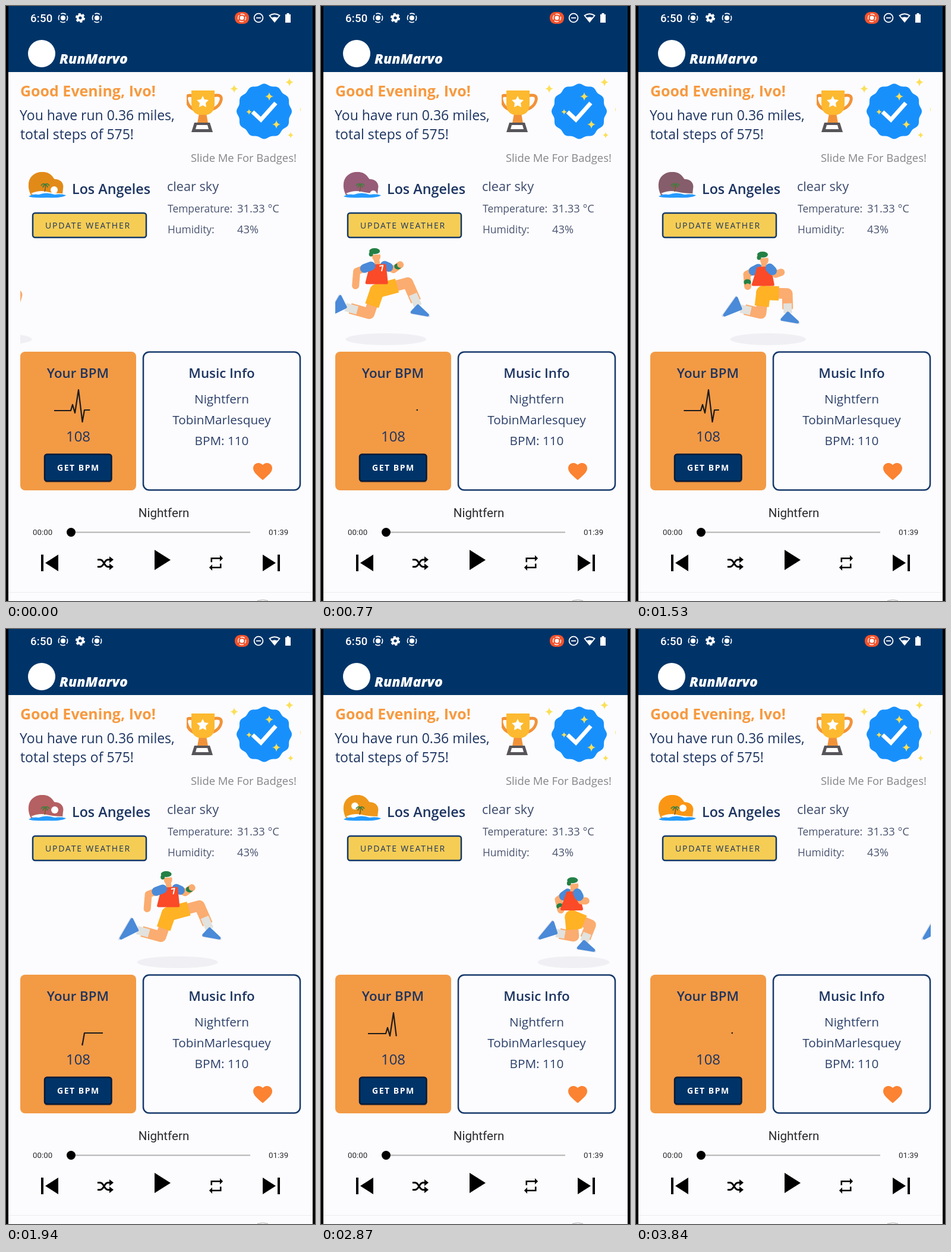
Write an HTML page with a canvas that moves like this. It is 520x1000 px and loops after 3880 ms.

```html
<!DOCTYPE html>
<html lang="en">
<head>
<meta charset="utf-8">
<title>Running dashboard</title>
<style>
  html, body { margin: 0; width: 100%; height: 100%; overflow: hidden; background: #fcfcfe; }
  svg, canvas { position: absolute; left: 0; top: 0; width: 520px; height: 1000px; }
  text { font-family: "Open Sans", "Noto Sans", sans-serif; fill: #1c3461; }
  .body { font-size: 23px; }
  .head { font-size: 22.3px; font-weight: 600; }
  .info { font-size: 20.7px; fill: #2b3f68; }
  .small { font-size: 17.4px; fill: #4a5470; }
  .value { font-size: 18.3px; fill: #4a5470; }
  .mid { text-anchor: middle; }
  .caps { font-size: 14px; font-weight: 500; letter-spacing: 1.8px; }
  .player { font-family: Roboto, sans-serif; fill: #2a2a2e; }
  .sky { animation: sky 3880ms linear infinite; }
  .sun { animation: sun 3880ms linear infinite; }
  @keyframes sky {
    0% { fill: #e28a18; } 19.8% { fill: #975c78; } 29.1% { fill: #585a72; } 50% { fill: #b56062; }
    64.4% { fill: #de8416; } 83.5% { fill: #ffaa1e; } 99%, 100% { fill: #fb9614; }
  }
  @keyframes sun {
    0% { transform: translate(81px, 309px); }
    19.8% { transform: translate(88px, 316px); }
    29.1%, 43.8% { transform: translate(88px, 325px); }
    50% { transform: translate(82px, 304px); }
    55.4% { transform: translate(87px, 325px); }
    55.41% { transform: translate(44px, 325px); }
    64.4% { transform: translate(51px, 308px); }
    83.5% { transform: translate(63px, 287px); }
    99%, 100% { transform: translate(79px, 301px); }
  }
</style>
</head>
<body>
<svg viewBox="0 0 520 1000">
  <defs>
    <path id="spark" d="M0-7Q1-1 7 0Q1 1 0 7Q-1 1-7 0Q-1-1 0-7"/>
    <g id="record" fill="none" stroke="#fff" stroke-width="1.7">
      <circle r="7.6" stroke-dasharray="9 2.94" stroke-dashoffset="4"/>
      <circle r="3.2" fill="#fff"/>
    </g>
    <path id="skip" d="M0 0h4v28h-4zM29 0v28L7 14z"/>
    <path id="blob" d="M38 299C39 285 51 278 62 279C76 279 79 289 82 291C93 291 98 299 96 307L95 317Q70 311 42 318Q37 308 38 299"/>
    <clipPath id="skyClip"><use href="#blob"/></clipPath>
    <clipPath id="cupClip"><rect x="304" y="135" width="70" height="80"/></clipPath>
  </defs>

  <rect width="520" height="1000" fill="#fcfcfe"/>
  <rect width="520" height="111" fill="#003468"/>
  <path d="M0 0h4v1000h-4zM516 0h4v1000h-4z"/>

  <!-- status bar -->
  <text x="41" y="27" style="font:500 18.5px Roboto,sans-serif;fill:#fff;letter-spacing:.3px">6:50</text>
  <use href="#record" x="96" y="20"/>
  <g transform="translate(125 20)" fill="none" stroke="#fff">
    <circle r="4.4" stroke-width="3.6"/><circle r="6.6" stroke-width="3" stroke-dasharray="3.9 3.01"/>
  </g>
  <use href="#record" x="153" y="20"/>
  <rect x="385" y="10" width="24" height="20" rx="9" fill="#f4522c"/>
  <use href="#record" transform="translate(397 20) scale(.85)"/>
  <g fill="none" stroke="#fff" stroke-width="1.8"><circle cx="425" cy="20" r="7.4"/><path d="M421 20h8"/>
    <path d="M443.5 16Q452 10.5 460.5 16L452 26.5z"/></g>
  <path d="M446 20Q452 17 458 20L452 27zM472.500 12h4v2h2.500v14h-9v-14h2.500z" fill="#fff"/>

  <circle cx="60" cy="80" r="23" fill="#fff"/>
  <text x="90" y="97" style="font-size:23px;font-weight:800;font-style:italic;fill:#fff">RunMarvo</text>

  <!-- greeting -->
  <text x="24" y="152" style="font-size:25px;font-weight:700;fill:#f79a40">Good Evening, Ivo!</text>
  <text class="body" x="23" y="192">You have run 0.36 miles,</text>
  <text class="body" x="24" y="224">total steps of 575!</text>
  <text x="311" y="262" style="font-size:18.4px;fill:#85858a">Slide Me For Badges!</text>

  <!-- badges -->
  <g clip-path="url(#cupClip)">
    <path d="M314 151Q302 148 304 158Q307 172 320 175M348 151Q364 147 362 158Q359 171 343 175" fill="none" stroke="#f29238" stroke-width="5"/>
    <path d="M325 180h12l3 17h-18z" fill="#f29238"/>
    <path d="M312 142h39v22q0 16-13 19h-13q-13-3-13-19z" fill="#fdb92f"/>
    <path d="M331 151l3 6 7 1-5 5 1 7-6-3-6 3 1-7-5-5 7-1z" fill="#fff"/>
    <path d="M317 196h26l5 16h-36z" fill="#57555a"/>
    <path d="M321 200h18l2 7h-22z" fill="#fff"/>
  </g>
  <path id="badge" fill="#1890fc"/>
  <path d="M415 178l14 13 25-28" fill="none" stroke="#fff" stroke-width="7"/>
  <g fill="#fbdf58">
    <use href="#spark" x="477" y="128"/><use href="#spark" x="384" y="139"/><use href="#spark" x="443" y="152"/>
    <use href="#spark" transform="translate(409 178) scale(.7)"/><use href="#spark" x="455" y="199"/>
    <use href="#spark" transform="translate(479 217) scale(.75)"/>
    <path d="M495 174l1-4v8z"/>
  </g>

  <!-- weather -->
  <use href="#blob" class="sky"/>
  <g clip-path="url(#skyClip)"><circle class="sun" r="6" fill="#fff"/></g>
  <path d="M42 315Q56 309 68 312T96 315L92 318H48z" fill="#fcfcfe"/>
  <path d="M38 320Q46 315 55 317Q68 312 82 317Q92 315 101 318Q96 323 69 322Q45 323 38 320" fill="#259bff"/>
  <path d="M65 312q2-7 1-12" fill="none" stroke="#7a5a2a" stroke-width="1.6"/>
  <path d="M66 300q-4-3-7 2M66 300q-3 1-4 5M66 300q4-3 7 2M66 300q3 1 4 5" fill="none" stroke="#3d7f3c" stroke-width="1.8"/>
  <text x="111" y="316" style="font-size:23.3px;font-weight:600">Los Angeles</text>
  <rect x="45" y="348" width="191" height="41" rx="4" fill="#f5cd55" stroke="#12386a" stroke-width="2.5"/>
  <text class="caps" x="66" y="374">UPDATE WEATHER</text>
  <text x="271" y="311" style="font-size:21.7px;fill:#3c4a6c">clear sky</text>
  <text class="small" x="272" y="347">Temperature:</text><text class="value" x="389" y="347">31.33 °C</text>
  <text class="small" x="272" y="382">Humidity:</text><text class="value" x="389" y="382">43%</text>

  <!-- cards -->
  <rect x="24" y="581" width="195" height="233" rx="8" fill="#f39a45"/>
  <text class="head mid" x="121" y="625">Your BPM</text>
  <text class="mid" x="121.5" y="732" style="font-size:24px">108</text>
  <rect x="65" y="755" width="113" height="46" rx="4" fill="#0003"/>
  <rect x="65" y="753.5" width="112.5" height="45" rx="4" fill="#003468" stroke="#061a38" stroke-width="2.5"/>
  <text class="caps" x="86" y="781" style="font-weight:700;fill:#fff;letter-spacing:1.5px">GET BPM</text>
  <rect x="231" y="581.5" width="264" height="232" rx="10" fill="none" stroke="#173a6c" stroke-width="2.5"/>
  <text class="head mid" x="363" y="625">Music Info</text>
  <text class="info mid" x="363" y="668">Nightfern</text>
  <text class="info mid" x="363" y="703">TobinMarlesquey</text>
  <text class="info mid" x="363" y="738">BPM: 110</text>
  <path transform="translate(412.8 763.2) scale(1.6)" fill="#fb8332" d="M12 21L10.5 19.7C5.4 15.4 2 12.3 2 8.5C2 5.4 4.4 3 7.5 3C9.2 3 10.9 3.8 12 5.1C13.1 3.8 14.8 3 16.5 3C19.6 3 22 5.4 22 8.5C22 12.3 18.6 15.4 13.5 19.7z"/>

  <!-- player -->
  <text class="player mid" x="265.5" y="859" style="font-size:20.6px">Nightfern</text>
  <text class="player" x="45" y="889" style="font-size:13.3px">00:00</text>
  <text class="player" x="442" y="889" style="font-size:13.3px">01:39</text>
  <path d="M109 884.500H411" stroke="#b2b2b2" stroke-width="2"/>
  <circle cx="109.5" cy="884.5" r="7.5"/>
  <use href="#skip" x="59" y="922"/>
  <use href="#skip" transform="translate(461 922) scale(-1 1)"/>
  <path d="M250 914v34l27-17z"/>
  <path d="M154 930.500h4q3 0 5 3l4 6q2 3 5 3h4M154 942.500h4q3 0 5-3l4-6q2-3 5-3h4" fill="none" stroke="#000" stroke-width="3"/>
  <path d="M174 925l7 5.500-7 5.500zM174 937l7 5.500-7 5.500z"/>
  <path transform="translate(338 920.5) scale(1.29)" d="M7 7h10v3l4-4-4-4v3H5v6h2zM17 17H7v-3l-4 4 4 4v-3h12v-6h-2z"/>
  <path d="M4 985.500H516" stroke="#ececf0"/>
  <path d="M423 999.500Q433 996.500 441 999.500" fill="none" stroke="#aaa"/>
</svg>
<canvas width="520" height="1000"></canvas>

<script>
const LOOP = 3880, STRIDE = 1235, PULSE = 1540;
const SKIN = '#fbac70', BLUE = '#4a8ad8', SHORTS = '#ffb224', RED = '#fa4a28', GREEN = '#238045';
const ctx = document.querySelector('canvas').getContext('2d');
const clamp = v => Math.min(1, Math.max(0, v));
const mix = (a, b, k) => a + (b - a) * k;
const between = (p, q, k) => [mix(p[0], q[0], k), mix(p[1], q[1], k)];

const rim = Array.from({ length: 144 }, (_, i) => {
  const a = i * Math.PI / 72, r = 45 + 1.5 * Math.cos(12 * a);
  return `${434.5 + r * Math.cos(a)} ${177 + r * Math.sin(a)}`;
});
document.getElementById('badge').setAttribute('d', `M${rim.join('L')}z`);

// Points per pose: hair, hip, shadow (centre, radius), near arm, far arm, near leg, far leg.
const leap = [[0, 412], [4, 479], [19, 68],
  [-6, 437], [-30, 446], [-32, 470], [17, 436], [32, 443], [43, 435],
  [56, 465], [73, 504], [91, 521], [-9, 517], [-49, 506], [-79, 521]];
const pass = [[16, 427], [13, 487], [10, 57],
  [7, 447], [-5, 459], [2, 473], [20, 447], [23, 463], [29, 467],
  [35, 512], [11, 535], [29, 551], [23, 516], [-2, 513], [-32, 520]];
const push = [[9, 416], [7, 483], [12, 61],
  [24, 437], [38, 450], [48, 444], [-3, 437], [-18, 452], [-24, 472],
  [-12, 516], [-46, 520], [-58, 545], [53, 477], [48, 517], [66, 544]];
const swap = ([a, b, c, ...limbs]) => [a, b, c,
  ...limbs.slice(3, 6), ...limbs.slice(0, 3), ...limbs.slice(9), ...limbs.slice(6, 9)];
const gait = [[-.03, leap], [.03, leap], [.317, pass], [.427, push], [.47, swap(leap)],
  [.53, swap(leap)], [.817, swap(pass)], [.927, swap(push)], [.97, leap], [1.03, leap]];

function poseAt(phase) {
  const i = gait.findIndex(([p]) => p > phase);
  const [[p0, a], [p1, b]] = [gait[i - 1], gait[i]];
  return a.map((pt, j) => between(pt, b[j], (phase - p0) / (p1 - p0)));
}

function line(points, color, width, cap = 'round') {
  ctx.beginPath();
  points.forEach(p => ctx.lineTo(...p));
  ctx.strokeStyle = color;
  ctx.lineWidth = width;
  ctx.lineCap = cap;
  ctx.lineJoin = 'round';
  ctx.stroke();
}

function shape(points, color, round) {
  line([...points, points[0]], color, round);
  ctx.fillStyle = color;
  ctx.fill();
}

function oval(x, y, rx, ry, color) {
  ctx.beginPath();
  ctx.ellipse(x, y, rx, ry, 0, 0, 7);
  ctx.fillStyle = color;
  ctx.fill();
}

function drawLeg(hip, knee, ankle, toe) {
  const [dx, dy] = [toe[0] - ankle[0], toe[1] - ankle[1]];
  const heel = [ankle[0] - dy * .65, ankle[1] + dx * .65];
  line([hip, knee, between(knee, ankle, .8)], SKIN, 18, 'butt');
  line([between(knee, ankle, .5), ankle], '#e2e2de', 14, 'butt');
  line([heel, toe], '#dcdfea', 4);
  shape([ankle, between(heel, ankle, .1), between(toe, ankle, .1)], BLUE, 5);
  line([hip, between(hip, knee, .65)], SHORTS, 24, 'butt');
  oval(...hip, 12, 12, SHORTS);
}

function drawArm(shoulder, elbow, hand) {
  line([shoulder, elbow, hand], SKIN, 12);
  line([shoulder, between(shoulder, elbow, .45)], BLUE, 15);
}

function drawRunner(t) {
  const phase = ((t - 738) / STRIDE + 1) % 1;
  const [hair, hip, shadow, ...limbs] = poseAt(phase);
  const [nearArm, farArm, nearLeg, farLeg] = [0, 3, 6, 9].map(i => limbs.slice(i, i + 3));
  ctx.save();
  ctx.beginPath();
  ctx.rect(24, 395, 472, 180);
  ctx.clip();
  ctx.translate(90 + .1534 * (t - 770), 0);
  oval(shadow[0], 560, shadow[1], 10, '#f0f0f4');
  drawArm(...farArm);
  oval(...between(farArm[1], farArm[2], .65), 6, 5, GREEN);
  oval(...farArm[2], 5, 5, SKIN);
  drawLeg(hip, ...farLeg);
  drawLeg(hip, ...nearLeg);

  const [x, y] = hair;
  const [near, far] = [nearArm[0], farArm[0]];
  const [back, front] = near[0] < far[0] ? [near, far] : [far, near];
  line([[x + 2, y + 9], between(near, far, .5)], SKIN, 9);
  shape([back, front, [hip[0] + 16, hip[1] - 14], [hip[0] - 17, hip[1] - 14]], RED, 5);
  if (back === near) {
    const [cx, cy] = [far[0] - 8, far[1] + 1];
    line([[cx, cy], [cx + 5, cy - 1], [cx + 3, cy + 8]], '#fff', 2);
  }
  oval(x + 3, y + 9, 7, 8.5, SKIN);
  line([[x - 6, y + 5], [x + 9, y + 4]], '#f4f4f4', 3);
  oval(x, y, 9, 5, GREEN);
  oval(x - 6, y + 5, 3.5, 4, GREEN);
  drawArm(...nearArm);
  ctx.restore();
}

const beat = [[79, 680], [109, 680], [112, 670], [116, 684], [122, 645], [128.5, 699], [132, 679], [163, 679]];
const spans = beat.slice(1).map((p, i) => Math.hypot(p[0] - beat[i][0], p[1] - beat[i][1]));
const beatLength = spans.reduce((a, b) => a + b);

function drawTrimmed(from, to) {
  let done = 0;
  const points = [];
  spans.forEach((len, i) => {
    const a = clamp((from * beatLength - done) / len), b = clamp((to * beatLength - done) / len);
    if (b > a) points.push(between(beat[i], beat[i + 1], a), between(beat[i], beat[i + 1], b));
    done += len;
  });
  if (points.length) line(points, '#1c1c1c', 2.2, 'butt');
}

function drawPulse(t) {
  const u = (t + 660) % PULSE;
  const k = clamp((u - 580) / 765);
  const start = k * k * k * (k * (6 * k - 15) + 10);
  const end = Math.sin(Math.PI / 2 * clamp((u - 30) / 900));
  drawTrimmed(Math.min(start, .988), end);
  if (u < 120) drawTrimmed(.988, 1);
}

const began = performance.now();
function render() {
  const t = (performance.now() - began) % LOOP;
  ctx.clearRect(0, 0, 520, 1000);
  drawRunner(t);
  drawPulse(t);
  requestAnimationFrame(render);
}
render();
</script>
</body>
</html>
```
